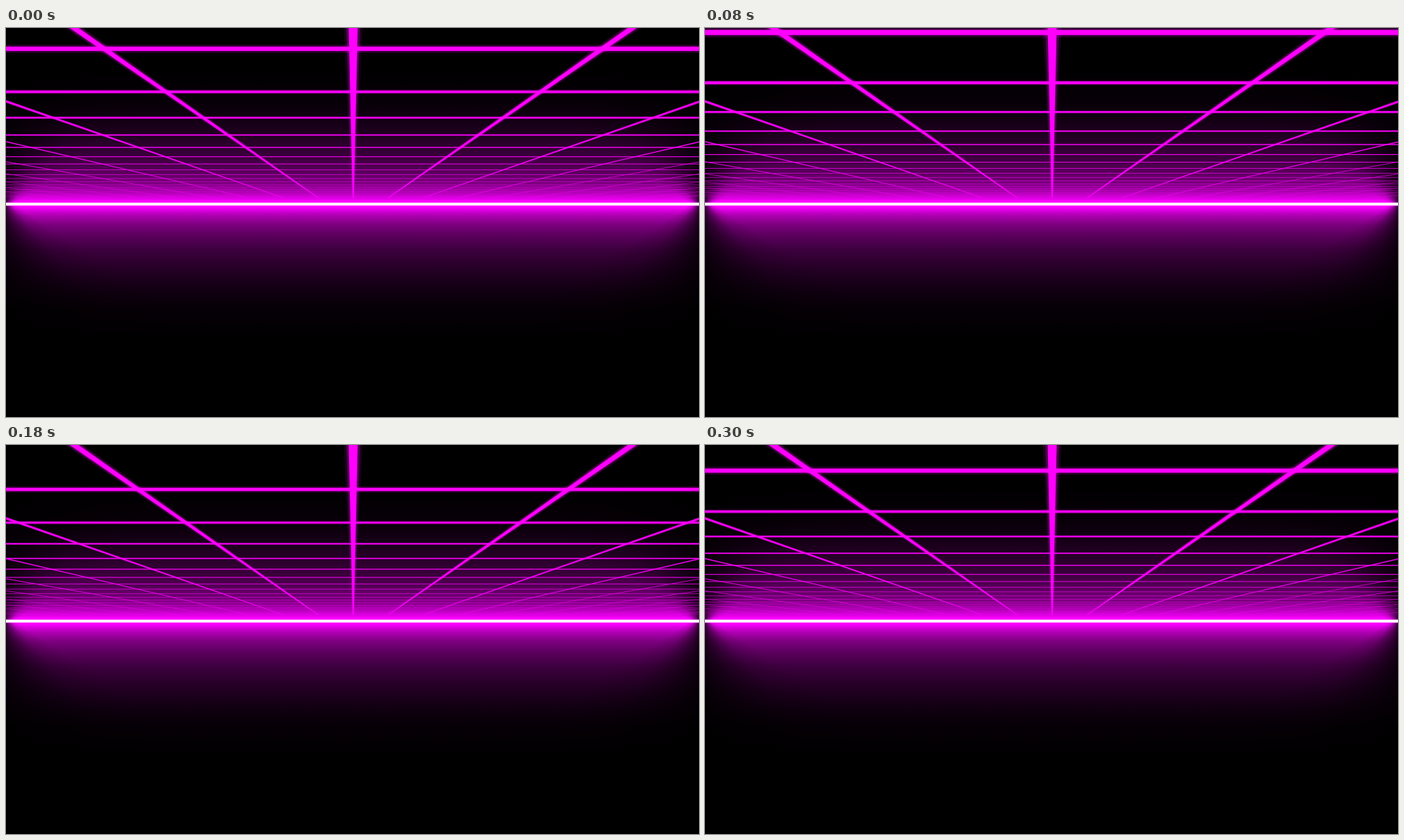
An HTML page with a canvas for the animation above (360 ms loop, 998 px wide and 561 px high).

```html
<!DOCTYPE html>
<html lang="en">
<head>
<meta charset="utf-8">
<title>Neon grid</title>
<style>
html, body { margin: 0; width: 998px; height: 561px; overflow: hidden; background: #000; }
canvas { display: block; }
</style>
</head>
<body>
<canvas id="stage" width="998" height="561"></canvas>
<script>
const W = 998, H = 561, LOOP = 360;
const CENTER = 500, VANISH = 280, HORIZON = 254, GRID_END = 245;
const ctx = document.getElementById('stage').getContext('2d');

// [width factor, opacity]: soft halo first, solid core last
const layers = [[2.1, 0.1], [1.55, 0.22], [1, 1]];

// [distance from the horizon, opacity]
const falloff = [[0, 1], [5, 1], [8, 0.9], [16, 0.7], [30, 0.49], [46, 0.36],
  [66, 0.24], [96, 0.14], [126, 0.065], [150, 0.025], [200, 0]];

function glowAt(distance) {
  const i = falloff.findIndex(([d]) => d > distance);
  if (i < 0) return 0;
  const [d0, a0] = falloff[i - 1], [d1, a1] = falloff[i];
  return a0 + (a1 - a0) * (distance - d0) / (d1 - d0);
}

// The glow never moves, so it is painted once, row by row
function paintGlow() {
  const layer = document.createElement('canvas');
  layer.width = W;
  layer.height = H;
  const g = layer.getContext('2d');
  for (let y = HORIZON - 200; y < HORIZON + 200; y++) {
    const distance = Math.abs(y + 0.5 - HORIZON);
    const alpha = glowAt(distance);
    const edge = Math.min(0.24, (12 + distance * 1.5) / W);
    const fade = g.createLinearGradient(0, 0, W, 0);
    for (const [at, level] of [[0, 0.2], [0.3, 0.55], [0.6, 0.86], [1, 1]]) {
      const color = `rgba(250,0,255,${alpha * level})`;
      fade.addColorStop(at * edge, color);
      fade.addColorStop(1 - at * edge, color);
    }
    g.fillStyle = fade;
    g.fillRect(0, y, W, 1);
  }
  g.fillStyle = '#f8f';
  g.fillRect(0, HORIZON - 2.4, W, 4.8);
  g.fillStyle = '#fff';
  g.fillRect(0, HORIZON - 1.7, W, 3.4);
  return layer;
}

function drawRay(k, scale) {
  const x = CENTER + k * 1.435 * VANISH, half = 6.5 * scale;
  ctx.beginPath();
  ctx.moveTo(CENTER, VANISH);
  ctx.lineTo(x - half, 0);
  ctx.lineTo(x + half, 0);
  ctx.fill();
}

function drawCrossbar(depth, scale) {
  const drop = 757.6 / depth;
  const thickness = 6 * (drop / 250) ** 2 * scale;
  ctx.fillRect(0, VANISH - drop - thickness / 2, W, thickness);
}

const glow = paintGlow();

function render(time) {
  // 20 ms ticks; the fifth is held twice and the last one rests
  const tick = Math.min(15, Math.floor(time % LOOP / 20));
  const step = tick > 4 ? tick - 1 : tick;
  const phase = 3.03 - 0.0652 * step;

  ctx.fillStyle = '#000';
  ctx.fillRect(0, 0, W, H);
  ctx.save();
  ctx.beginPath();
  ctx.rect(0, 0, W, GRID_END);
  ctx.clip();
  ctx.fillStyle = '#f0f';
  for (const [scale, alpha] of layers) {
    ctx.globalAlpha = alpha;
    for (let k = -10; k <= 10; k++) drawRay(k, scale);
    for (let n = 0; n < 20; n++) drawCrossbar(phase + n, scale);
  }
  ctx.restore();
  ctx.drawImage(glow, 0, 0);
}

function frame() {
  render(performance.now());
  requestAnimationFrame(frame);
}
frame();
</script>
</body>
</html>
```
